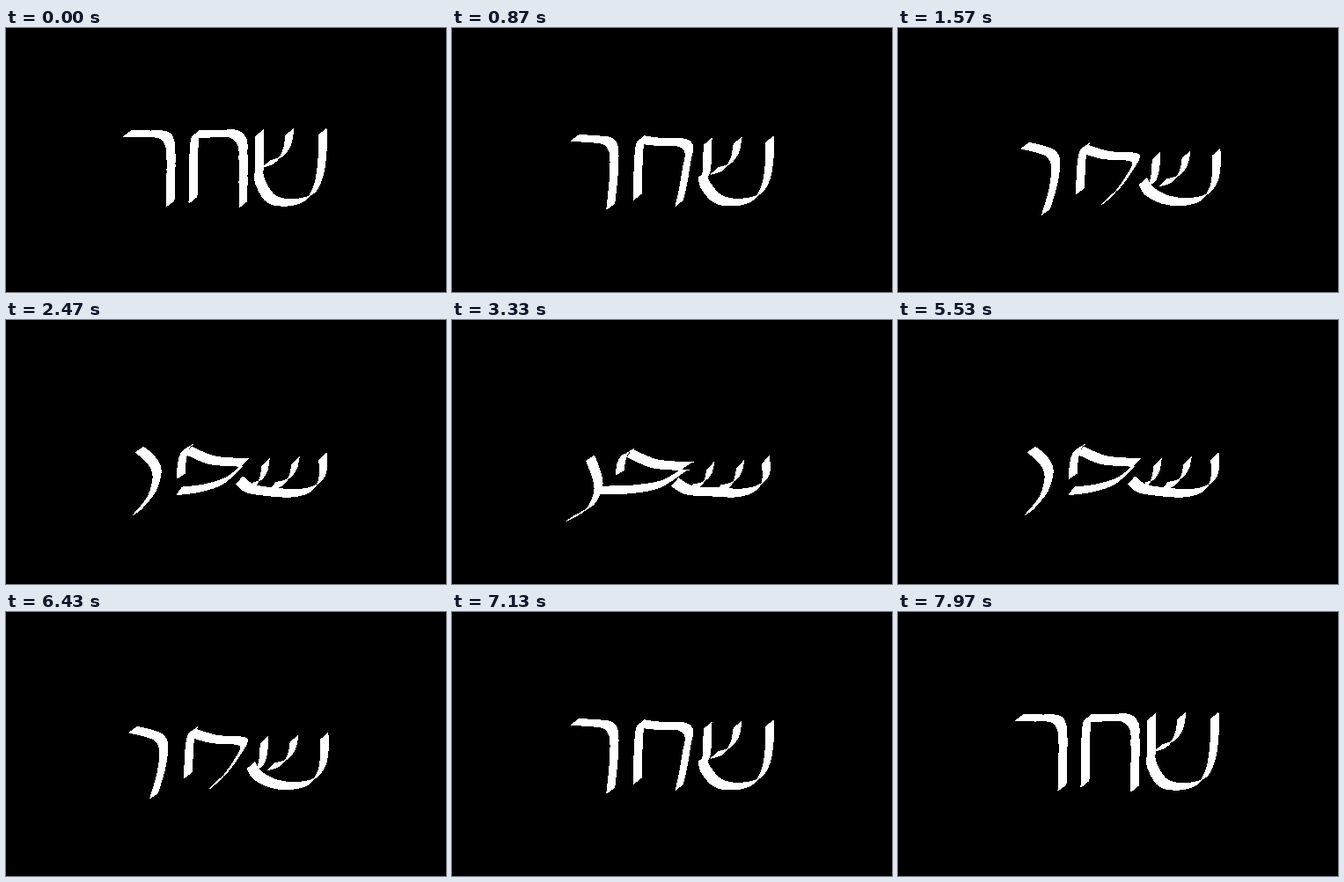
Animation of 500x300 px, one loop 8000 ms. Source, as an HTML page:

```html
<!DOCTYPE html>
<html lang="he">
<head>
<meta charset="utf-8">
<title>Morphing word</title>
<style>
  html, body { margin: 0; height: 100%; overflow: hidden; background: #000; }
  svg { display: block; width: 500px; height: 300px; fill: #fff; stroke: #fff; stroke-linejoin: round; }
</style>
</head>
<body>
<svg viewBox="0 0 500 300" shape-rendering="crispEdges"></svg>
<script>
const LOOP = 8000;
const svg = document.querySelector('svg');
const strokes = [];
const mix = (a, b, t) => a + (b - a) * t;

// A slanted pen sweeps a curve that morphs from one pose to the other.
// lead: how far y runs ahead of x; drift: sideways swing midway.
function stroke(lead, drift, from, to) {
  const path = document.createElementNS(svg.namespaceURI, 'path');
  svg.append(path);
  strokes.push({ path, lead, drift, from, to });
}

const pose = (nib, ...xy) => ({
  nib,
  pts: xy.flatMap((x, i) => i % 2 ? [] : [[x, xy[i + 1]]])
});

// Quarter ellipses: hook falls, then turns left; shoulder goes left, then falls.
const ANGLES = [0, 1, 2, 3].map(i => i * Math.PI / 6);
const hook = (nib, x, y, w, h) => ({
  nib, pts: ANGLES.map(a => [x - w * (1 - Math.cos(a)), y + h * Math.sin(a)])
});
const shoulder = (nib, x, y, w, h) => ({
  nib, pts: ANGLES.map(a => [x - w * Math.sin(a), y + h * (1 - Math.cos(a))])
});

const PEN = [9, -7.5], STEEP = [8, -9];

// Left letter
stroke(0, 0,
  pose([9, -7], 133, 124, 155, 124, 174, 125, 182, 136, 183, 165, 182, 203),
  pose([9, -6], 154, 163, 157, 174, 160, 188, 160, 201, 150, 219, 127, 230));

// Middle letter: bar with right leg, then left leg
stroke(1, 3,
  pose(PEN, 211, 124, 232, 124, 254, 124, 264, 134, 265, 150, 265, 180, 265, 204),
  pose([5, -9], 198, 156, 227, 168, 265, 171, 264, 172, 232, 191, 195, 197, 157, 198));
stroke(0.5, 3,
  shoulder(PEN, 211, 125, 3, 74),
  shoulder([9, -5], 196, 153, 12, 22));

// Right letter: bowl, middle tooth, left tooth
stroke(1, 4,
  pose(PEN, 355, 122, 355, 148, 351, 176, 341, 195, 320, 202, 297, 198, 284, 178, 283, 165),
  pose(STEEP, 351, 164, 352, 176, 350, 187, 338, 197, 320, 201, 295, 200, 264, 198, 246, 189));
stroke(1, 4, hook(PEN, 318, 122, 26, 36), hook(STEEP, 323, 169, 26, 28));
stroke(1, 4, hook(PEN, 284, 123, 1, 47), hook(STEEP, 289, 171, 25, 25));

// Catmull-Rom curve as cubic Bezier commands
function curve(pts) {
  const at = i => pts[Math.max(0, Math.min(pts.length - 1, i))];
  let d = pts[0].join();
  for (let i = 0; i < pts.length - 1; i++) {
    const [a, b, c, e] = [at(i - 1), at(i), at(i + 1), at(i + 2)];
    const h1 = b.map((v, k) => v + (c[k] - a[k]) / 6);
    const h2 = c.map((v, k) => v - (e[k] - b[k]) / 6);
    d += `C${h1} ${h2} ${c}`;
  }
  return d;
}

function draw(now) {
  const e = (1 - Math.cos(2 * Math.PI * (now % LOOP) / LOOP)) / 2;
  const bump = e * (1 - e);
  for (const { path, lead, drift, from, to } of strokes) {
    const near = from.pts.map(([x, y], i) => [
      mix(x, to.pts[i][0], e) + 4 * drift * bump,
      mix(y, to.pts[i][1], e + lead * bump)
    ]);
    const [nx, ny] = from.nib.map((n, k) => mix(n, to.nib[k], e));
    const far = near.map(([x, y]) => [x + nx, y + ny]).reverse();
    path.setAttribute('d', `M${curve(near)}L${curve(far)}Z`);
  }
}

const start = performance.now();
function tick() {
  draw(performance.now() - start);
  requestAnimationFrame(tick);
}
tick();
</script>
</body>
</html>
```
